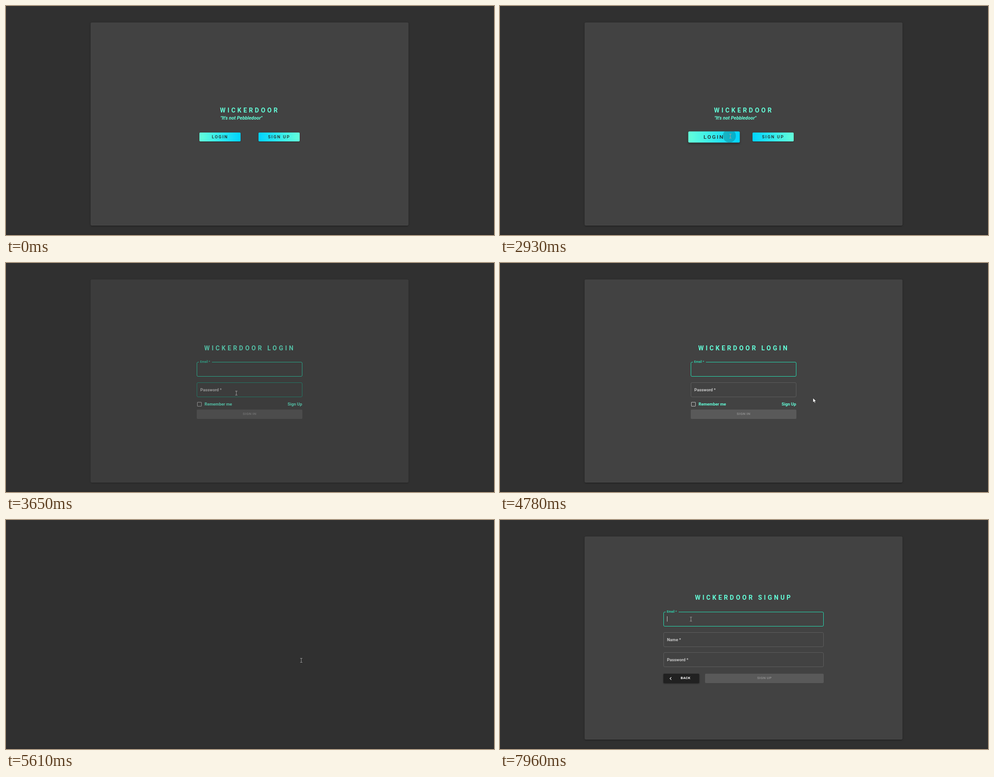
These frames come from a looping animation (1090 by 514 pixels, 7990 ms). An HTML page:

```html
<!DOCTYPE html>
<html lang="en">
<head>
<meta charset="utf-8">
<title>Sign-in flow</title>
<style>
  html, body { margin: 0; width: 100%; height: 100%; overflow: hidden; background: #303030; }
  #stage { position: relative; width: 1090px; height: 514px; overflow: hidden; font-family: Roboto, sans-serif; }
  #stage div { position: absolute; box-sizing: border-box; }
  .scene { inset: 0; }
  .card { left: 189px; top: 37px; width: 710px; height: 455.5px; border-radius: 3px; background: #424242;
    box-shadow: 0 2px 1px -1px #0003, 0 1px 1px #0002, 0 1px 4px #0003; }
  .text { line-height: 20px; white-space: pre; font-weight: 700; }
  .title { left: 189px; width: 711px; text-align: center; font-size: 14px; letter-spacing: 4.45px; color: #64ffda; }
  .pill { width: 91.5px; height: 19.5px; top: 284.3px; border-radius: 2px; text-align: center; color: #222;
    font: 500 9.33px/19.5px Roboto, sans-serif; letter-spacing: 2px; overflow: hidden; box-shadow: 0 1px 2px #0006; }
  .button { height: 20.5px; border-radius: 2px; background: #595959; color: #8c8c8c; text-align: center;
    font: 700 8px/20.5px Roboto, sans-serif; letter-spacing: .28px; }
  .dark { background: #212121; color: #fff; box-shadow: 0 1px 3px #0008; }
  .field { height: 32.5px; border: 1px solid #5e5e5e; border-radius: 3px; }
  .field.hover { border-color: #1c9a80; }
  .field.focus { border: 1.5px solid #1de9b6; border-color: #26dfb3; }
  .name { left: 7px; top: 5.5px; font-size: 9.33px; color: #c6c6c6; }
  .focus .name { left: 4px; top: -6px; width: 29px; padding-left: 2.5px; line-height: 11px; font-size: 7px;
    color: #30cfaa; background: #424242; }
  .caret { left: 7px; top: 9px; width: 1px; height: 12px; background: #ccc; visibility: hidden; }
  .link { font-size: 9.33px; color: #64ffda; }
  #ripple { border-radius: 50%; background: #0003; }
  #pointer { position: absolute; left: 0; top: 0; overflow: visible; }
</style>
</head>
<body>
<div id="stage"></div>
<script>
const LOOP = 7990, LOGIN_AT = 2980, BLUR_AT = 5480, SIGNUP_AT = 5560, FADE = 1500;
const fields = {
  login: [['Email *', 426, 222, 236], ['Password *', 426, 268, 236]],
  signup: [['Email *', 365, 206, 358], ['Name *', 365, 252, 358], ['Password *', 365, 297.3, 358]]
};
// time, x, y
const path = [
  [1010, 7, 303], [1250, 110, 245], [1450, 235, 206], [1620, 370, 218], [1800, 523.5, 266],
  [1820, 523.5, 266], [2250, 514, 292], [3940, 514, 292], [4720, 699, 303], [4780, 699, 303],
  [4950, 709, 306], [5250, 659, 315], [7190, 659, 315], [7800, 426, 222.5]
];
const pointers = {
  arrow: '<path d="M0 0V10L2.4 7.9L4 11.4L5.6 10.7L4.1 7.3H7.2Z" fill="#fff" stroke="#111" stroke-width=".6"/>',
  hand: '<path d="M-1 1Q0-.6 1 1V5L5.5 6Q6.5 6.5 6 9L5 13H-1L-4 8.5Q-4 7-2.5 7.5L-1 9Z" fill="#fff" stroke="#111" stroke-width=".7"/>',
  beam: '<path d="M-2-4.5H3M-2 4.5H3M.5-4.5V4.5" fill="none" stroke="#a5a5a5" stroke-width=".9"/>'
};

const pos = (x, y, w) => `left:${x}px;top:${y}px;` + (w ? `width:${w}px;` : '');
const div = (cls, style, inner = '') => `<div class="${cls}" style="${style}">${inner}</div>`;
const title = (text, y) => div('text title', `top:${y - 10}px`, text);
const link = (text, x, y) => div('text link', pos(x, y - 10), text);
const button = (text, x, y, w) => div('button', pos(x, y, w), text);
const field = ([name, x, y, w]) =>
  div('field', pos(x, y, w), div('text name', '', name) + div('caret', ''));
const scene = (id, body) => `<div class="scene" id="${id}"><div class="card"></div>${body}</div>`;
const pill = (id, text, x, from, to) =>
  `<div class="pill" id="${id}" style="left:${x}px;background:linear-gradient(90deg,${from},${to})">${text}<div id="${id}Ink"></div></div>`;

const stage = document.getElementById('stage');
stage.innerHTML =
  div('', 'left:0;top:511px;width:1090px;height:3px;background:#2d2c2c') +
  scene('home',
    title('WICKERDOOR', 234) +
    div('text', pos(479, 242) + 'font-size:10.67px;font-style:italic;color:#64ffda', '"It\'s not Pebbledoor"') +
    pill('enter', 'LOGIN', 432.3, '#64ffda', '#00d4ff') +
    pill('join', 'SIGN UP', 564.3, '#00d4ff', '#64ffda')) +
  scene('login',
    title('WICKERDOOR LOGIN', 190.7) + fields.login.map(field).join('') +
    div('', pos(427, 312, 10) + 'height:10px;border:1.2px solid #c4c4c4;border-radius:1px') +
    link('Remember me', 443.5, 317) + link('Sign Up', 629, 317) +
    button('SIGN IN', 426, 329, 236)) +
  scene('signup',
    title('WICKERDOOR SIGNUP', 174) + fields.signup.map(field).join('') +
    div('button dark', pos(365, 345.3, 80) + 'padding-left:19px', 'BACK') +
    '<svg style="position:absolute;left:378px;top:351px" width="8" height="10"><path d="M4.7 1.8L1.7 4.8L4.7 7.8" fill="none" stroke="#fff" stroke-width="1.2"/></svg>' +
    button('SIGN UP', 458, 345.3, 265)) +
  '<svg id="pointer" width="1" height="1"><g></g></svg>';

const get = id => document.getElementById(id);
const home = get('home'), enter = get('enter'), ink = get('enterInk');
const pointer = get('pointer').firstChild;
ink.id = 'ripple';

const clamp = v => Math.max(0, Math.min(1, v));
const easeOut = p => 1 - (1 - clamp(p)) ** 2.2;

function pointerAt(t) {
  const i = path.findIndex(p => p[0] > t);
  if (i < 0) return path.at(-1).slice(1);
  if (i === 0) return null;
  const [t0, x0, y0] = path[i - 1], [t1, x1, y1] = path[i];
  const p = (t - t0) / (t1 - t0);
  return [x0 + (x1 - x0) * p, y0 + (y1 - y0) * p];
}

function inside(at, x, y, w, h) {
  return !!at && at[0] >= x && at[0] <= x + w && at[1] >= y && at[1] <= y + h;
}

// Fades a form in, styles its fields and tells whether one is hovered.
function drawForm(id, t, start, end, at) {
  const shown = t >= start && t < end, el = get(id);
  el.style.opacity = shown ? easeOut((t - start - 60) / FADE) : 0;
  if (!shown) return false;
  const boxes = el.querySelectorAll('.field');
  let any = false;
  fields[id].forEach(([, x, y, w], i) => {
    const hover = inside(at, x, y, w, 32.5);
    const focus = i === 0 && !(id === 'login' && t >= BLUR_AT);
    any ||= hover;
    boxes[i].className = 'field' + (focus ? ' focus' : hover ? ' hover' : '');
    const blink = Math.floor((t - start - 60) / 500) % 2 === 0;
    boxes[i].lastChild.style.visibility = focus && blink ? 'visible' : 'hidden';
  });
  return any;
}

function draw() {
  const t = performance.now() % LOOP, at = pointerAt(t);

  home.style.opacity = t < LOGIN_AT ? 1 : 0;
  const grow = easeOut((t - 2110) / 240);
  enter.style.transform = `scale(${1 + .25 * grow})`;
  enter.style.boxShadow = `0 ${1 + grow}px ${2 + 2 * grow}px #0006`;
  const r = Math.max(0, t - 2800) * .0895;
  ink.style.cssText = `left:${73.3 - r}px;top:${8.2 - r}px;width:${2 * r}px;height:${2 * r}px`;

  const onLogin = drawForm('login', t, LOGIN_AT, SIGNUP_AT, at);
  const onSignup = drawForm('signup', t, SIGNUP_AT, LOOP, at);

  let kind = 'arrow';
  if (onLogin || onSignup || (t > 2800 && t < LOGIN_AT)) kind = 'beam';
  else if (t < LOGIN_AT ? inside(at, 432, 284, 92, 20) : t < SIGNUP_AT && inside(at, 629, 311, 33, 12)) kind = 'hand';
  if (pointer.dataset.kind !== kind) {
    pointer.dataset.kind = kind;
    pointer.innerHTML = pointers[kind];
  }
  pointer.setAttribute('visibility', at ? 'visible' : 'hidden');
  if (at) pointer.setAttribute('transform', `translate(${at[0]} ${at[1]})`);
  requestAnimationFrame(draw);
}
draw();
</script>
</body>
</html>
```
